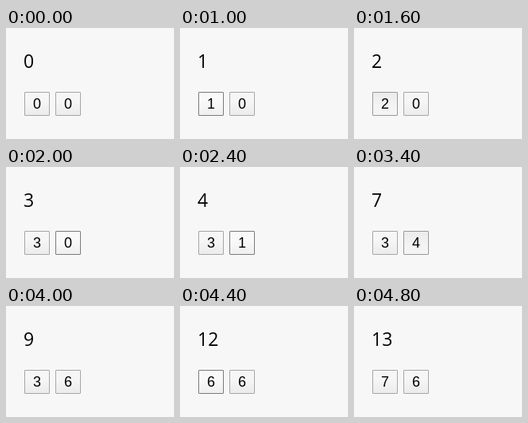
An HTML page that plays this animation: 211 px wide and 139 px high, repeating every 5100 ms.

```html
<!DOCTYPE html>
<html lang="en">
<head>
<meta charset="utf-8">
<title>Two counters and their sum</title>
<style>
  html, body { margin: 0; width: 100%; height: 100%; overflow: hidden; background: #f7f7f7; }
  svg { display: block; width: 100%; height: 100%; }
  #sum { font: 23px "Open Sans", "Noto Sans", sans-serif; }
  .btn text { font: 18px "Liberation Sans", Arial, sans-serif; text-anchor: middle; }
  .btn rect { fill: url(#idle); stroke: #a6a6a6; }
  .btn.hover rect { fill: url(#lit); stroke: #7b7b7b; }
  .btn.press rect { fill: url(#down); stroke: #999; }
</style>
</head>
<body>
<svg viewBox="0 0 211 139">
  <defs>
    <linearGradient id="idle" x2="0" y2="1">
      <stop offset=".38" stop-color="#f6f6f6"/><stop offset="1" stop-color="#ebebeb"/>
    </linearGradient>
    <linearGradient id="lit" x2="0" y2="1">
      <stop offset=".38" stop-color="#f9f9f9"/><stop offset="1" stop-color="#efefef"/>
    </linearGradient>
    <linearGradient id="down" x2="0" y2="1">
      <stop offset="0" stop-color="#ebebeb"/><stop offset=".62" stop-color="#f4f4f4"/>
    </linearGradient>
  </defs>
  <text id="sum" x="22" y="50">0</text>
  <g class="btn" transform="translate(23 80)">
    <rect x=".5" y=".5" width="31" height="29" rx=".5"/>
    <text x="16" y="21">0</text>
  </g>
  <g class="btn" transform="translate(62 80)">
    <rect x=".5" y=".5" width="31" height="29" rx=".5"/>
    <text x="16" y="21">0</text>
  </g>
</svg>
<script>
const LOOP = 5100;
const LEFT = 0, RIGHT = 1, NONE = -1;

// [time in ms, button under the pointer, state, clicks to add]
const steps = [
  [0, NONE, '', 0],
  [500, LEFT, 'hover', 0],
  [900, LEFT, 'press', 0],
  [1000, LEFT, 'hover', 1],
  [1300, LEFT, 'press', 0],
  [1400, LEFT, 'hover', 1],
  [1600, LEFT, 'press', 0],
  [1700, LEFT, 'hover', 1],
  [2000, RIGHT, 'hover', 0],
  [2300, RIGHT, 'press', 0],
  [2400, RIGHT, 'hover', 1],
  [3000, RIGHT, 'hover', 1],
  [3100, RIGHT, 'press', 0],
  [3200, RIGHT, 'hover', 1],
  [3300, RIGHT, 'press', 0],
  [3400, RIGHT, 'press', 1],
  [3500, RIGHT, 'hover', 0],
  [3600, RIGHT, 'hover', 1],
  [3800, RIGHT, 'press', 0],
  [3900, RIGHT, 'hover', 1],
  [4000, NONE, '', 0],
  [4100, LEFT, 'hover', 0],
  [4200, LEFT, 'hover', 1],
  [4300, LEFT, 'press', 1],
  [4400, LEFT, 'hover', 1],
  [4500, LEFT, 'hover', 1],
  [4700, RIGHT, 'hover', 0],
  [4800, NONE, '', 0]
];

const sum = document.getElementById('sum');
const buttons = [...document.querySelectorAll('.btn')];
const labels = buttons.map(b => b.querySelector('text'));

function render(t) {
  const counts = [0, 0];
  let target = NONE, state = '';
  for (const [at, button, look, clicks] of steps) {
    if (at > t) break;
    target = button;
    state = look;
    if (clicks) counts[button] += clicks;
  }
  sum.textContent = counts[LEFT] + counts[RIGHT];
  buttons.forEach((b, i) => {
    labels[i].textContent = counts[i];
    b.setAttribute('class', i === target ? 'btn ' + state : 'btn');
  });
}

const start = performance.now();
function tick() {
  render((performance.now() - start) % LOOP);
  requestAnimationFrame(tick);
}
tick();
</script>
</body>
</html>
```
